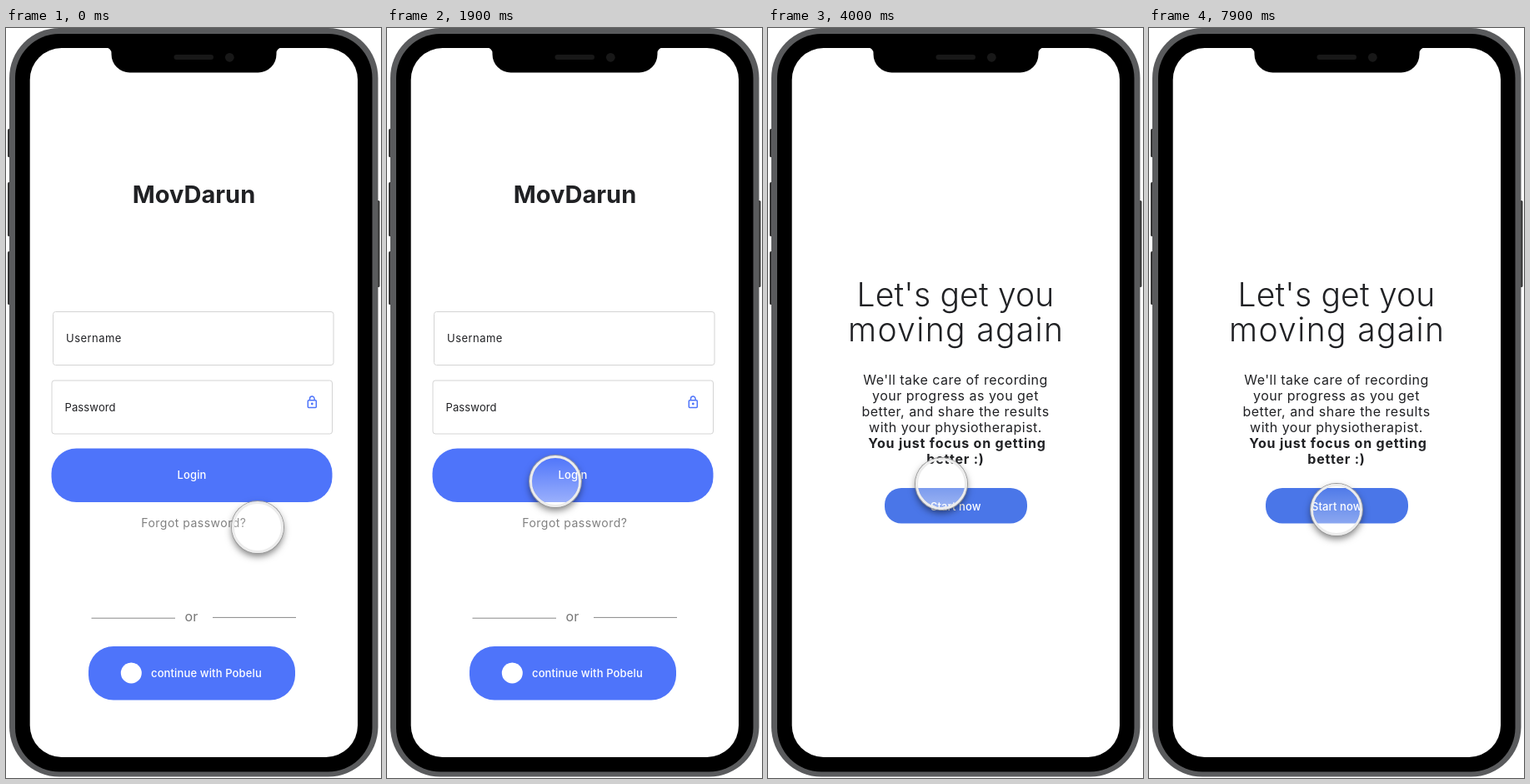
Animation of 450 by 900 pixels, one loop 8 s. Source, as an HTML page:

```html
<!DOCTYPE html>
<html lang="en">
<head>
<meta charset="utf-8">
<title>Phone login</title>
<style>
  html, body { margin: 0; width: 100%; height: 100%; overflow: hidden; background: #fff; }
  #stage { position: relative; width: 450px; height: 900px; overflow: hidden; }
  svg { position: absolute; left: 0; top: 0; display: block; }
  text { font-family: Inter, "Open Sans", sans-serif; font-size: 13px; letter-spacing: .01em; fill: #202124; }
  .mid { text-anchor: middle; }
  .title { font-size: 29px; font-weight: 700; letter-spacing: 0; }
  .button { font-weight: 500; fill: #fff; }
  .link { font-size: 14px; letter-spacing: .035em; fill: #808080; }
  .or { font-size: 16px; fill: #757575; }
  .head { font-size: 39px; font-weight: 300; letter-spacing: .005em; }
  .loose { letter-spacing: .035em; }
  .body { font-size: 16px; letter-spacing: .03em; }
  .strong { font-weight: 700; letter-spacing: .05em; }
  .field { fill: #fff; stroke: #d4d4d4; }
  .rule { stroke: #888; }
  .lock { fill: none; stroke: #4e74fa; stroke-width: 1.5; }
  .blue { fill: #4e74fa; }
  #ring {
    position: absolute; left: -31px; top: -31px; width: 62px; height: 62px;
    box-sizing: border-box; border: 3px solid #ececec; border-radius: 50%;
    background: linear-gradient(rgba(255,255,255,.02), rgba(255,255,255,.45)) padding-box;
    box-shadow: 0 0 0 1px #999, 0 4px 9px rgba(0,0,0,.5);
  }
</style>
</head>
<body>
<div id="stage">
  <svg width="450" height="900" viewBox="0 0 450 900">
    <defs>
      <clipPath id="screen"><rect x="28.7" y="24" width="393.3" height="851" rx="38"/></clipPath>
    </defs>

    <g fill="#333">
      <rect x="2" y="121" width="5" height="34" rx="1.5"/>
      <rect x="2" y="185" width="5" height="65" rx="1.5"/>
      <rect x="2" y="268" width="5" height="64" rx="1.5"/>
      <rect x="443" y="207" width="5.5" height="104" rx="1.5"/>
    </g>
    <rect x="4" y="0" width="442.5" height="898.5" rx="60" fill="#5a5b5d"/>
    <rect x="11" y="7" width="428.5" height="885.5" rx="53"/>

    <g clip-path="url(#screen)">
      <rect x="28" y="24" width="395" height="852" fill="#fff"/>

      <g id="login">
        <text class="mid title" x="225.5" y="209.5">MovDarun</text>
        <rect class="field" x="56.5" y="340.5" width="336.5" height="64" rx="3"/>
        <text class="loose" x="72" y="377">Username</text>
        <rect class="field" x="55" y="423" width="336.5" height="64" rx="3"/>
        <text x="70.5" y="460">Password</text>
        <g class="lock">
          <rect x="362.3" y="446.8" width="10" height="8.6" rx="1"/>
          <path d="M364.5 446.5v-1.6a2.8 2.8 0 0 1 5.6 0v1.6"/>
        </g>
        <circle class="blue" cx="367.3" cy="451" r="1.4"/>
        <rect class="blue" x="54.5" y="504.5" width="337" height="64.5" rx="30"/>
        <text class="mid button" x="223" y="541">Login</text>
        <text class="mid link" x="225.3" y="599">Forgot password?</text>
        <path class="rule" d="M102.5 708.2H203M248 707.4H348"/>
        <text class="mid or" x="222.5" y="712">or</text>
        <rect class="blue" x="99" y="742" width="248" height="64.5" rx="30"/>
        <circle cx="150.3" cy="774" r="12.5" fill="#fff"/>
        <text class="button" x="174" y="779">continue with Pobelu</text>
      </g>

      <g id="welcome">
        <g class="mid">
          <text class="head" x="225" y="334">Let's get you</text>
          <text class="head loose" x="225.7" y="376">moving again</text>
          <text class="body" x="225" y="428">We'll take care of recording</text>
          <text class="body" x="225" y="447">your progress as you get</text>
          <text class="body" x="225" y="466">better, and share the results</text>
          <text class="body" x="225" y="485">with your physiotherapist.</text>
          <text class="body strong" x="227" y="504">You just focus on getting</text>
          <text class="body strong" x="225" y="523">better :)</text>
        </g>
        <rect x="140" y="552" width="171" height="42.5" rx="20" fill="#4a76e8"/>
        <text class="mid button" x="225.3" y="579">Start now</text>
      </g>
    </g>

    <path d="M120 23.5a6.5 6.5 0 0 1 6.5 6.5v1.5a22 22 0 0 0 22 22h154a22 22 0 0 0 22-22v-1.5a6.5 6.5 0 0 1 6.5-6.5z"/>
    <rect x="201.5" y="32" width="47.5" height="6" rx="3" fill="#181818"/>
    <circle cx="268.3" cy="35.3" r="5.4" fill="#181818"/>
  </svg>
  <div id="ring"></div>
</div>
<script>
  const LOOP = 8000, STEP = 100, WIDTH = 393.5;
  const SLIDE_START = 2891, SLIDE_TIME = 300;

  // time, x, y of the pointer's centre
  const path = [
    [0, 302, 599], [500, 258, 567], [1100, 228, 548], [1900, 202, 544],
    [2200, 202, 544], [3000, 205, 542], [4000, 208, 547], [4600, 229, 581],
    [4900, 232, 581], [5100, 231, 579.5], [5300, 230, 579],
    [5500, 230, 579], [5900, 225, 578], [LOOP, 225, 578]
  ];

  const login = document.getElementById('login');
  const welcome = document.getElementById('welcome');
  const ring = document.getElementById('ring');

  const clamp = v => Math.min(1, Math.max(0, v));
  const smooth = u => u * u * (3 - 2 * u);
  const shift = (el, x) => el.setAttribute('transform', `translate(${x} 0)`);

  function pointer(t) {
    const i = path.findIndex(p => p[0] > t);
    const a = path[i - 1], b = path[i];
    const u = (t - a[0]) / (b[0] - a[0]);
    return [a[1] + (b[1] - a[1]) * u, a[2] + (b[2] - a[2]) * u];
  }

  function draw() {
    // the motion runs at ten pictures a second
    const t = Math.floor(performance.now() % LOOP / STEP) * STEP;
    const slide = WIDTH * smooth(clamp((t - SLIDE_START) / SLIDE_TIME));
    shift(login, -slide);
    shift(welcome, WIDTH - slide);
    const [x, y] = pointer(t);
    ring.style.transform = `translate(${x}px, ${y}px)`;
    requestAnimationFrame(draw);
  }
  draw();
</script>
</body>
</html>
```
